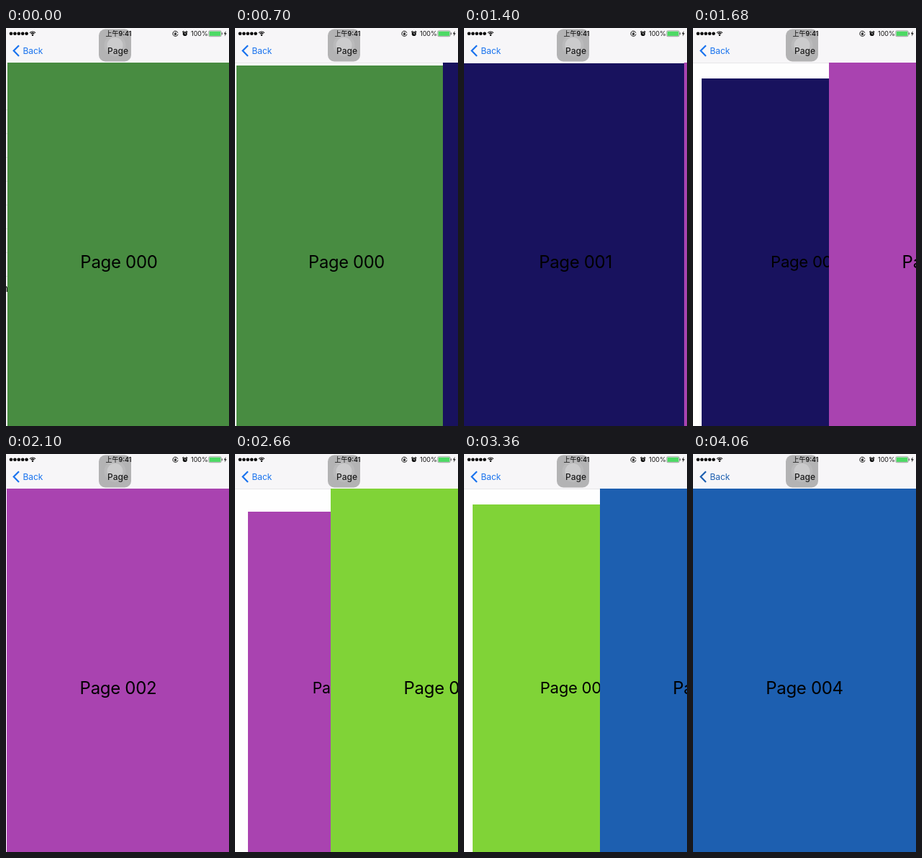
Write an HTML page with a canvas that moves like this. It is 310 px wide and 552 px high and loops after 4200 ms.

```html
<!DOCTYPE html>
<html lang="en">
<head>
<meta charset="utf-8">
<title>Page push transition</title>
<style>
html, body { margin: 0; width: 100%; height: 100%; overflow: hidden; background: #fff; }
canvas { display: block; width: 310px; height: 552px; }
</style>
</head>
<body>
<canvas id="stage"></canvas>
<script>
const W = 310, H = 552, BAR = 48, LOOP = 4200, STEP = 140, PUSH = 790;
const FONT = 'Inter, Roboto, "Noto Sans CJK SC", "Noto Sans CJK", sans-serif';
const COLORS = ['#488c41', '#18125e', '#a943b0', '#80d337', '#1d5fb0'];
const STARTS = [-PUSH, 555, 1336, 2232, 3016];

const canvas = document.getElementById('stage');
const ctx = canvas.getContext('2d');
const ratio = window.devicePixelRatio || 1;
canvas.width = W * ratio;
canvas.height = H * ratio;

// cubic-bezier(.42, 0, .58, 1)
function easeInOut(t) {
  if (t <= 0) return 0;
  if (t >= 1) return 1;
  let lo = 0, hi = 1;
  for (let i = 0; i < 24; i++) {
    const s = (lo + hi) / 2, r = 1 - s;
    const x = 1.26 * s * r * r + 1.74 * s * s * r + s * s * s;
    if (x < t) lo = s; else hi = s;
  }
  return lo * lo * (3 - 2 * lo);
}

function rect(x, y, w, h, color) {
  ctx.fillStyle = color;
  ctx.fillRect(x, y, w, h);
}

function disc(x, y, r, color) {
  ctx.fillStyle = color;
  ctx.beginPath();
  ctx.arc(x, y, r, 0, Math.PI * 2);
  ctx.fill();
}

function roundRect(x, y, w, h, r) {
  ctx.beginPath();
  ctx.roundRect(x, y, w, h, r);
}

function line(points, color, width) {
  ctx.strokeStyle = color;
  ctx.lineWidth = width;
  ctx.beginPath();
  points.forEach(([x, y]) => ctx.lineTo(x, y));
  ctx.stroke();
}

function arc(x, y, r, from, to, color, width) {
  ctx.strokeStyle = color;
  ctx.lineWidth = width;
  ctx.beginPath();
  ctx.arc(x, y, r, from, to);
  ctx.stroke();
}

function text(str, x, y, size, color, align = 'left', weight = 400, spacing = 0) {
  ctx.font = `${weight} ${size}px ${FONT}`;
  ctx.letterSpacing = spacing + 'px';
  ctx.textAlign = align;
  ctx.fillStyle = color;
  ctx.fillText(str, x, y);
}

function drawPage(index, x, scale) {
  const left = Math.round(W / 2 * (1 - scale));
  const top = Math.round(H / 2 * (1 - scale));
  rect(x + left, BAR + top, W - 2 * left, H - 2 * top, COLORS[index]);
  ctx.save();
  ctx.translate(x + W / 2, BAR + H / 2);
  ctx.scale(scale, scale);
  text('Page 00' + index, 0, 9, 24, '#000', 'center', 400, -0.3);
  ctx.restore();
}

function drawList() {
  rect(0, BAR, 4, H - BAR, '#ececec');
  for (let y = 113; y < 350; y += 33) rect(0, y, 4, 1, '#d8d8d8');
  text('n', 3, 366, 13, '#000', 'right');
}

function drawPages(t) {
  rect(0, 0, W, H, '#fefefe');
  rect(0, BAR, W, 0.5, '#cfced2');
  let top = 0;
  STARTS.forEach((start, i) => { if (t > start) top = i; });
  if (top === 0) {
    const x = Math.max(0, 2 - Math.round(t / STEP));
    if (x > 0) drawList();
    drawPage(0, x, 1);
    return;
  }
  const p = easeInOut((t - STARTS[top]) / PUSH);
  drawPage(top - 1, 0, 1 - 0.2 * p);
  drawPage(top, Math.round(W * (1 - p)), 1);
}

function drawTouchButton() {
  roundRect(129, 1.5, 45, 45, 9);
  ctx.fillStyle = '#b3b3b4';
  ctx.fill();
  disc(151.5, 24, 15, '#bababb');
  disc(151.5, 24, 11, '#cbcbcc');
}

function drawStatus() {
  for (let i = 0; i < 5; i++) disc(7 + i * 5.4, 7.8, 2.3, '#000');

  const up = -Math.PI / 2, span = Math.PI / 4;
  arc(37, 10.6, 5.6, up - span, up + span, '#000', 1.2);
  arc(37, 10.6, 3.4, up - span, up + span, '#000', 1.2);
  disc(37, 9.8, 1.2, '#000');

  text('上午9:41', 156.5, 11, 9, '#000', 'center', 500);

  // rotation lock
  arc(235.5, 7.8, 3.5, 0.2, Math.PI * 2 - 0.3, '#111', 1);
  rect(234, 7.3, 3, 2.3, '#111');
  arc(235.5, 7.2, 1, Math.PI, 0, '#111', 0.7);

  // alarm
  disc(248.8, 8, 3.1, '#111');
  line([[245.3, 5.8], [247.2, 4.3]], '#111', 1.1);
  line([[250.4, 4.3], [252.3, 5.8]], '#111', 1.1);
  line([[248.8, 6], [248.8, 8.2], [250.2, 8.2]], '#f7f6f8', 0.7);

  text('100%', 257, 11, 9, '#111');

  roundRect(281.9, 3.9, 17.2, 7.8, 1.4);
  ctx.strokeStyle = '#777';
  ctx.lineWidth = 0.7;
  ctx.stroke();
  rect(282.7, 4.7, 15.6, 6.2, '#4cd964');
  rect(299.8, 6.4, 1.1, 2.8, '#555');

  ctx.fillStyle = '#111';
  ctx.beginPath();
  [[305.6, 4], [302.9, 8.3], [304.7, 8.3], [303.9, 11.6], [306.8, 7.2], [305, 7.2]]
    .forEach(([x, y]) => ctx.lineTo(x, y));
  ctx.fill();
}

function drawBar(t) {
  const tint = t >= 4060 ? '#1d5fb0' : '#1a73ee';
  rect(0, 0, W, BAR, '#f7f6f8');
  drawTouchButton();
  drawStatus();
  line([[18, 24.2], [10.7, 31.6], [18, 39]], tint, 2.2);
  text('Back', 23.4, 36, 12, tint);
  text('Page', 155.5, 36, 12, '#1c1c1c', 'center', 500);
}

function frame(now) {
  const t = Math.floor((now % LOOP) / STEP) * STEP;
  ctx.setTransform(ratio, 0, 0, ratio, 0, 0);
  drawPages(t);
  drawBar(t);
  requestAnimationFrame(() => frame(performance.now() - begin));
}

const begin = performance.now();
frame(0);
</script>
</body>
</html>
```
